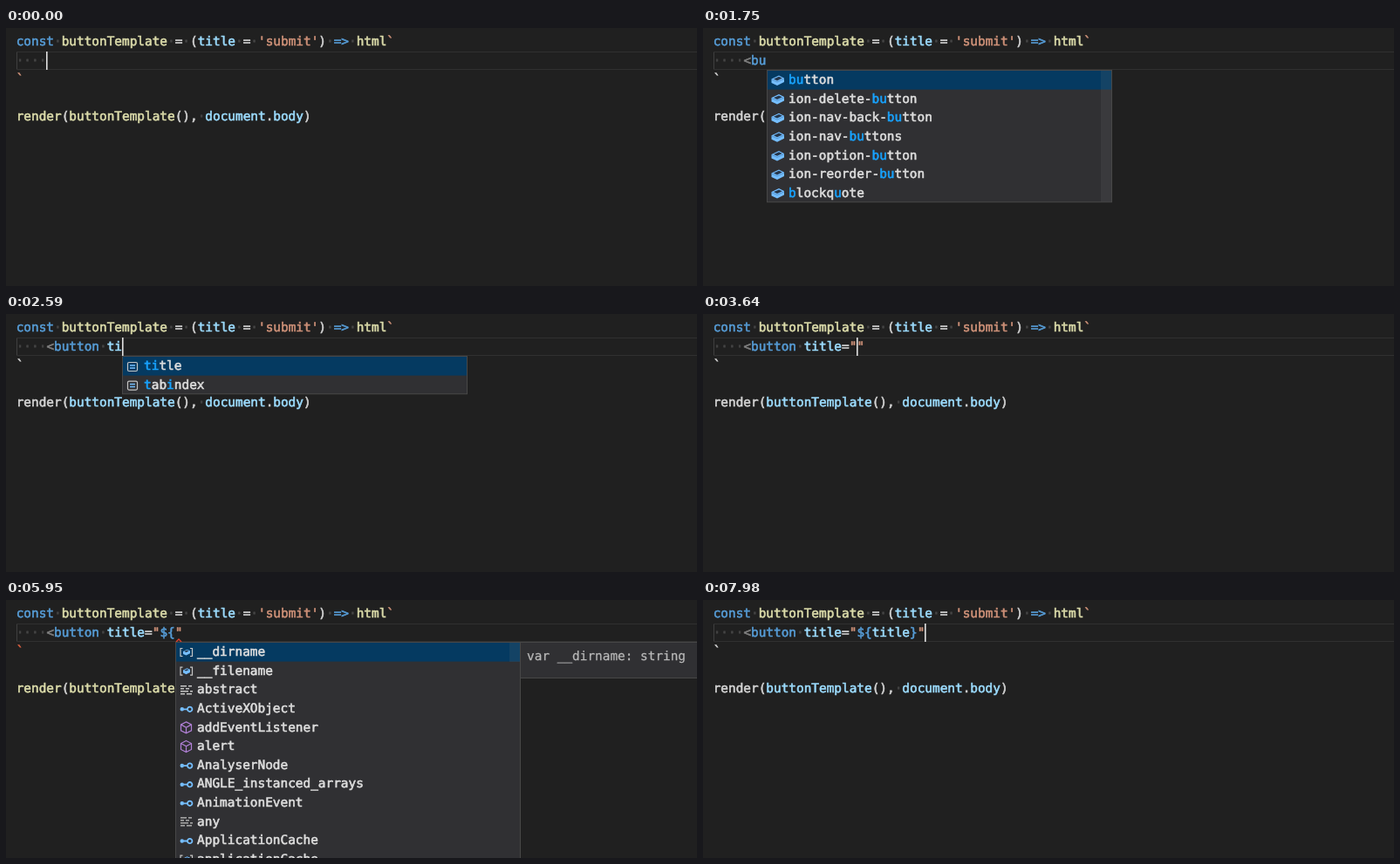
Animation, 792 px wide and 296 px high, one loop 8000 ms. Source, as an HTML page:

```html
<!DOCTYPE html>
<html lang="en">
<head>
<meta charset="utf-8">
<title>Template completion</title>
<style>
html, body { margin: 0; width: 100%; height: 100%; overflow: hidden; background: #202020; }
svg { display: block; width: 792px; height: 296px; }
text, tspan { stroke: currentColor; fill: currentColor; }
text { font: 14.4px "DejaVu Sans Mono", monospace; white-space: pre; stroke-width: .6px; text-rendering: geometricPrecision; }
text.detail { stroke-width: .25px; }
</style>
</head>
<body>
<svg id="stage" viewBox="0 0 792 296"></svg>
<script>
const LOOP = 8000, CHAR = 8.667, ROW = 21.6, LEFT = 12, POPUP_TOP = 48, POPUP_WIDTH = 395;
const C = {
  text: '#d4d4d4', blue: '#569cd6', pale: '#9cdcfe', yellow: '#dcdcaa', string: '#ce9178',
  gray: '#808080', dot: '#444444', match: '#18a3ff', label: '#dedede', error: '#e0402f',
  popup: '#303033', border: '#474747', selected: '#053a61'
};

const shape = (d, stroke, fill = 'none', width = 1.2) =>
  `<path d="${d}" stroke="${stroke}" fill="${fill}" stroke-width="${width}"/>`;
const ICONS = {
  tag: shape('M.5 6.5L9 2.5L15 5.5V10L7 14L.5 11Z', 'none', '#75beff') +
    shape('M3 6.5L9 3.8L12.8 5.6L7 8.4Z', 'none', '#25364a') + shape('M1 7.3L7 10L15 6.2', '#4d8fc7', 'none', .8),
  attr: shape('M3 3.5H11Q12.5 3.5 12.5 5V12Q12.5 13.5 11 13.5H3Q1.5 13.5 1.5 12V5Q1.5 3.5 3 3.5Z', '#c5c5c5') +
    shape('M4 7H10M4 10H10', '#75beff', 'none', 1.5),
  v: shape('M3.5 3.5H1V12.5H3.5M12 3.5H14.5V12.5H12', '#c5c5c5') +
    shape('M4 7L8.5 4.7L12 6.2V9.3L7.5 11.6L4 10Z', 'none', '#75beff') +
    shape('M5.2 7.1L8.5 5.6L10.6 6.5L7.5 8Z', 'none', '#25364a'),
  k: shape('M1 3.5H8M10 3.5H14M1 6.5H5M7 6.5H11M1 9.5H10M12 9.5H15M1 12.5H6M8 12.5H14', '#c5c5c5', 'none', 1.4),
  i: shape('M.5 8.5A2.3 2.3 0 1 1 5.1 8.5A2.3 2.3 0 1 1 .5 8.5', 'none', '#75beff') +
    shape('M5 8.5H9M9 8.5A2.7 2.7 0 1 1 14.4 8.5A2.7 2.7 0 1 1 9 8.5', '#75beff', 'none', 1.8),
  f: shape('M7.5 1.5L13.5 4.5V11.5L7.5 14.5L1.5 11.5V4.5ZM1.5 4.5L7.5 7.8L13.5 4.5M7.5 7.8V14.5', '#b180d7'),
  p: shape('M2.5 13.5L8.5 7.5', '#c5c5c5', 'none', 3) +
    shape('M13.8 4.5A4 4 0 1 1 10.5 1.6L9.3 4.6L11 6.2Z', 'none', '#c5c5c5')
};

const list = (kind, words) => words.split(' ').map(label => ({ kind, label }));
const mixed = words => words.split(' ').map(word => ({ kind: word[0], label: word.slice(2) }));

const POPUPS = {
  open: { items: list('tag', 'a abbr address area article aside audio b base bdi bdo blockquote'), thumb: 22 },
  b: { query: 'b', items: list('tag', 'b base bdi bdo blockquote body br button ion-back-button ion-badge ion-button ion-buttons'), thumb: 80 },
  bu: { query: 'bu', items: list('tag', 'button ion-delete-button ion-nav-back-button ion-nav-buttons ion-option-button ion-reorder-button blockquote'), thumb: 150 },
  attrs: { items: list('attr', 'accesskey autofocus class contenteditable contextmenu dir disabled draggable dropzone form formaction hidden'), thumb: 40 },
  t: { query: 't', items: list('attr', 'tabindex title translate type data-target data-text data-theme data-toggle data-track data-type on-tap on-touch') },
  ti: { query: 'ti', items: list('attr', 'title tabindex') },
  tit: { query: 'tit', items: list('attr', 'title') },
  scope: {
    items: mixed('v:__dirname v:__filename k:abstract i:ActiveXObject f:addEventListener f:alert i:AnalyserNode i:ANGLE_instanced_arrays i:AnimationEvent k:any i:ApplicationCache v:applicationCache'),
    thumb: 22, detail: 'var __dirname: string'
  },
  scopeT: {
    query: 't', thumb: 22, detail: '(parameter) title: string',
    items: mixed('p:title k:this k:throw k:true k:try k:type k:typeof i:Text i:TextDecoder i:TextEncoder i:TextEvent i:TextMetrics')
  },
  scopeTi: {
    query: 'ti', thumb: 26, thumbOpacity: .4, detail: '(parameter) title: string',
    items: mixed('p:title f:timingSafeEqual i:TimeRanges v:TIMEOUT v:ETIME v:ETIMEDOUT f:toASCII v:NOTIMP v:NOTINITIALIZED k:this f:triggerAsyncId f:triggerId')
  }
};

// time, typed tag, attribute, value (null = no quotes yet), cursor column, popup
const STEPS = [
  [0, '', '', null, 4],
  [420, '<', '', null, 5, 'open'],
  [770, '<b', '', null, 6, 'b'],
  [980, '<bu', '', null, 7, 'bu'],
  [1890, '<button', '', null, 11],
  [2170, '<button ', '', null, 12, 'attrs'],
  [2450, '<button ', 't', null, 13, 't'],
  [2590, '<button ', 'ti', null, 14, 'ti'],
  [2730, '<button ', 'tit', null, 15, 'tit'],
  [3570, '<button ', 'title', '', 19],
  [5180, '<button ', 'title', '$', 20],
  [5390, '<button ', 'title', '${', 21, 'scope'],
  [6230, '<button ', 'title', '${t', 22, 'scopeT'],
  [6370, '<button ', 'title', '${ti', 23, 'scopeTi'],
  [7140, '<button ', 'title', '${title', 26],
  [7630, '<button ', 'title', '${title}', 27],
  [7840, '<button ', 'title', '${title}', 28]
];

const escape = s => s.replace(/&/g, '&amp;').replace(/</g, '&lt;').replace(/>/g, '&gt;');
const span = (s, color) => s && `<tspan color="${color}">${escape(s)}</tspan>`;
const rect = (x, y, w, h, attrs) => `<rect x="${x}" y="${y}" width="${w}" height="${h}" ${attrs}/>`;
const panel = (x, y, w, h) => rect(x, y, w, h, `fill="${C.popup}" stroke="${C.border}"`);

function codeLine(row, tokens) {
  const spans = tokens.map(([s, color]) =>
    s.split(/( )/).map(part => part === ' ' ? span('·', C.dot) : span(part, color)).join(''));
  return `<text x="11.7" y="${20 + row * ROW}">${spans.join('')}</text>`;
}

function matches(label, query) {
  const lower = label.toLowerCase(), hits = new Set();
  let at = Math.max(0, lower.indexOf(query));
  for (const letter of query) {
    at = lower.indexOf(letter, at);
    hits.add(at++);
  }
  return hits;
}

function popupView({ items, query = '', thumb, thumbOpacity = .12, detail }, col, age) {
  const x = Math.floor(LEFT + col * CHAR + .5) + .5, y = POPUP_TOP + .5;
  let out = panel(x, y, POPUP_WIDTH, items.length * ROW) +
    rect(x + .5, y + .5, POPUP_WIDTH - 1, ROW, `fill="${C.selected}"`);
  items.forEach(({ kind, label }, i) => {
    const hits = matches(label, query), top = POPUP_TOP + i * ROW;
    const text = [...label].map((ch, n) => span(ch, hits.has(n) ? C.match : C.label)).join('');
    out += `<g transform="translate(${x + 4.5} ${top + 4})">${ICONS[kind]}</g>` +
      `<text x="${x + 24.6}" y="${top + 16.2}">${text}</text>`;
  });
  if (thumb) out += rect(x + POPUP_WIDTH - 12.5, y + .5, 12, thumb, `fill="#808080" fill-opacity="${thumbOpacity}"`);
  if (detail && age >= 140) {
    const side = x + POPUP_WIDTH;
    out += panel(side, y, 400, 41) +
      `<text class="detail" x="${side + 7.6}" y="69" color="#b8b8b8">${escape(detail)}</text>`;
  }
  return out;
}

function valueTokens(value) {
  if (value === null) return [];
  const expression = value.startsWith('${');
  const inner = expression
    ? [['${', C.blue], [value.slice(2).replace('}', ''), C.pale], [value.endsWith('}') ? '}' : '', C.blue]]
    : [[value, C.string]];
  return [['=', C.text], ['"', C.string], ...inner, ['"', C.string]];
}

function view(t) {
  const [start, tag, attr, value, col, popup] = STEPS.findLast(step => step[0] <= t);
  const age = t - start;
  const broken = !!value && value.startsWith('${') && !value.endsWith('}');
  const plain = !tag || broken;
  const tick = broken ? '#dc6040' : plain ? C.string : C.text;
  let out = rect(12.5, 27.5, 790, 20, 'fill="none" stroke="#303030"') +
    rect(12, 28, 1, 19, 'fill="#404040"');
  out += codeLine(0, [['const ', C.blue], ['buttonTemplate', C.yellow], [' = (', C.text], ['title', C.pale],
    [' = ', C.text], ["'submit'", C.string], [') ', C.text], ['=> ', C.blue], ['html', C.yellow], ['`', C.string]]);
  out += codeLine(1, [['    ', C.dot], [tag.slice(0, 1), C.gray], [tag.slice(1), C.blue],
    [attr, C.pale], ...valueTokens(value)]);
  out += codeLine(2, [['`', tick]]);
  out += codeLine(4, [['render', plain ? C.yellow : C.text], ['(', C.text],
    ['buttonTemplate', plain ? C.yellow : C.pale], ['(), ', C.text], ['document', C.pale],
    ['.', C.text], ['body', C.pale], [')', C.text]]);
  if (broken) {
    const x = LEFT + col * CHAR;
    out += shape(`M${x + 1} 48L${x + 4} 45L${x + 7} 48`, C.error, 'none', 1.3);
  }
  if (age % 1000 < 500) out += rect(Math.round(LEFT + col * CHAR - .6), 27, 1.6, 21, 'fill="#e0e0e0"');
  if (popup) out += popupView(POPUPS[popup], col, age);
  return out;
}

const stage = document.getElementById('stage');
const origin = performance.now();
let shown = '';
function tick(now) {
  const next = view(Math.max(0, now - origin) % LOOP);
  if (next !== shown) stage.innerHTML = shown = next;
  requestAnimationFrame(tick);
}
tick(origin);
</script>
</body>
</html>
```
